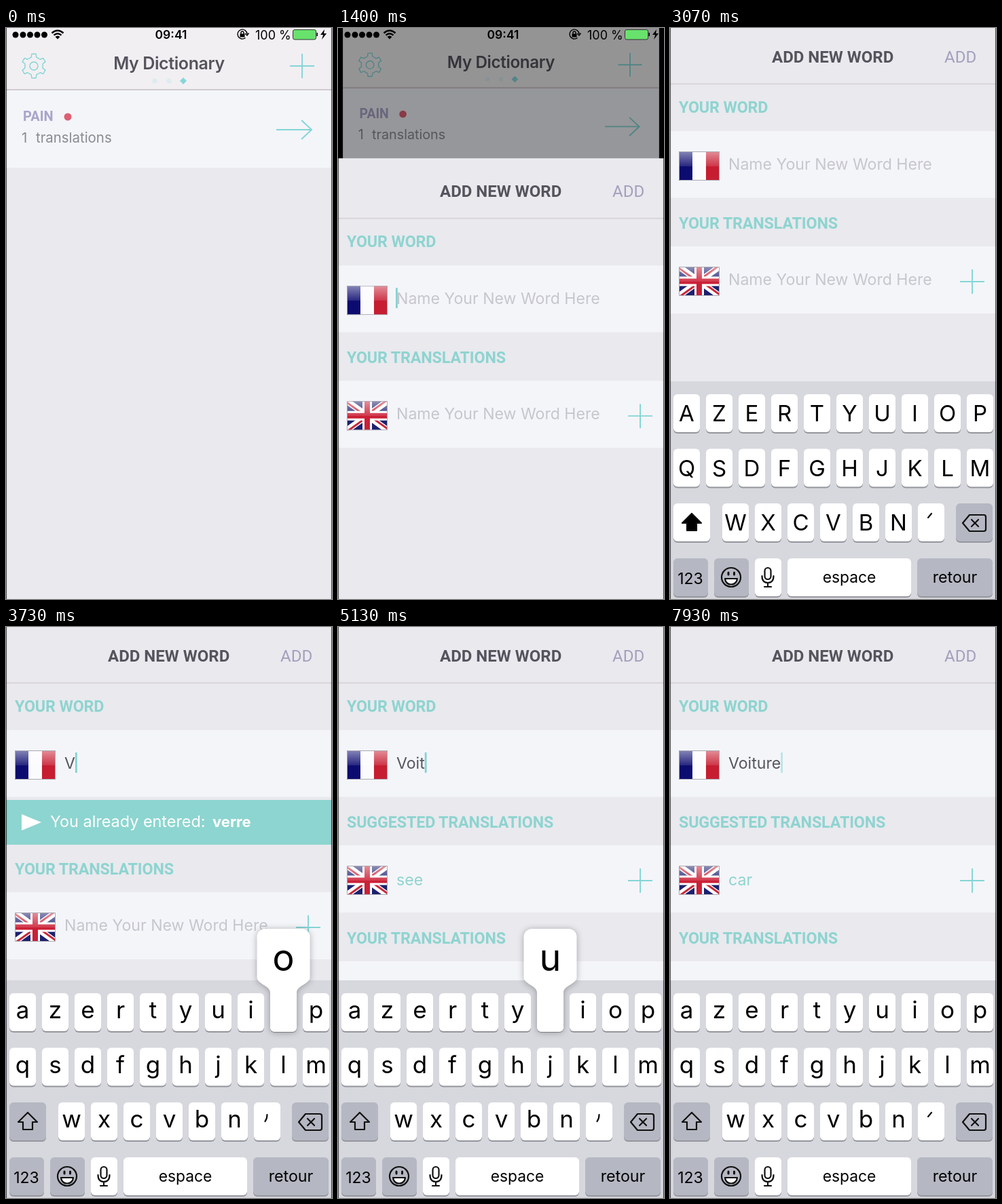
Animation of 480 by 842 pixels, one loop 8000 ms. Source, as an HTML page:

```html
<!DOCTYPE html>
<html lang="en">
<head>
<meta charset="utf-8">
<title>My Dictionary</title>
<style>
  html, body { margin: 0; width: 100%; height: 100%; overflow: hidden; background: #000; }
  svg.stage { display: block; width: 100%; height: 100%; }
  text { font-family: Inter, sans-serif; white-space: pre; }
  .caps { font: 600 23.3px Roboto, sans-serif; letter-spacing: -.15px; fill: #8ed4d0; }
  .field { font-size: 23.1px; fill: #55555d; }
  .hint { fill: #c6c6cd; }
  .teal { fill: #8ed4d0; }
  .line { fill: none; stroke: #84d5d6; stroke-width: 1.9; }
  .mid { text-anchor: middle; }
  .icon { fill: none; stroke: #111; stroke-width: 2.2; stroke-linejoin: round; stroke-linecap: round; }
  #pop { filter: drop-shadow(0 1px 5px rgba(0, 0, 0, .3)); }

  #page, #dim, #sheet, #keyboard { animation: 8s infinite; }
  #page { animation-name: recede; transform-origin: 240px 0; }
  #dim { animation-name: dim; }
  #sheet { animation-name: rise; }
  #keyboard { animation-name: open; }
  @keyframes recede { 0%, 14.02% { transform: scale(1); } 21.5%, 100% { transform: scale(.96); } }
  @keyframes dim { 0%, 14.02% { opacity: 0; } 21.5%, 100% { opacity: .5; } }
  @keyframes rise { 0%, 14.02% { transform: translateY(852px); } 21.5%, 100% { transform: translateY(0); } }
  @keyframes open { 0%, 27.85% { transform: translateY(322px); } 33.6%, 100% { transform: translateY(0); } }
</style>
</head>
<body>
<svg class="stage" viewBox="0 0 480 842">
  <defs>
    <linearGradient id="gloss" x2="0" y2="1">
      <stop offset="0" stop-color="#fff" stop-opacity=".5"/>
      <stop offset=".5" stop-color="#fff" stop-opacity=".12"/>
      <stop offset=".51" stop-color="#fff" stop-opacity="0"/>
    </linearGradient>
    <symbol id="shine" overflow="visible">
      <path fill="url(#gloss)" d="M0 0h60v43h-60z"/>
      <path fill="none" stroke="#a9a9b2" d="M.5 .5h59v42h-59z"/>
    </symbol>
    <symbol id="france" viewBox="0 0 60 43" width="60" height="43">
      <path fill="#fbfbfd" d="M0 0h60v43h-60z"/>
      <path fill="#0c0c70" d="M0 0h20v43h-20z"/>
      <path fill="#c71d31" d="M40 0h20v43h-20z"/>
      <use href="#shine"/>
    </symbol>
    <symbol id="britain" viewBox="0 0 60 43" width="60" height="43">
      <path fill="#1c2170" d="M0 0h60v43h-60z"/>
      <g fill="none" stroke="#fff">
        <path stroke-width="9" d="M0 0L60 43M60 0L0 43"/>
        <path stroke="#c8283a" stroke-width="3" d="M0 2l30 21.500M60-2l-30 21.500M60 41l-30-21.500M0 45l30-21.500"/>
        <path stroke-width="14" d="M30 0v43M0 21.500h60"/>
        <path stroke="#cb2036" stroke-width="8" d="M30 0v43M0 21.500h60"/>
      </g>
      <use href="#shine"/>
    </symbol>
    <path id="plus" class="line" d="M-18 0h36M0 -18v36"/>
  </defs>

  <rect width="480" height="842"/>
  <g id="page">
    <rect width="480" height="842" fill="#e9e9ee"/>
    <rect width="480" height="91" fill="#f1eff2"/>
    <rect y="92" width="480" height="114" fill="#f3f5f9"/>
    <path stroke="#c9c1c6" stroke-width="1.5" d="M0 91h480"/>
    <g class="line" style="stroke-width:1.4"><path id="gear" stroke-linejoin="round"/><circle cx="41" cy="56" r="6"/></g>
    <text class="mid" x="240" y="60.5" font-size="25" font-weight="600" letter-spacing="-.4" fill="#55545c">My Dictionary</text>
    <g fill="#dcebee"><circle cx="219" cy="78" r="3.5"/><circle cx="240" cy="78" r="3.5"/></g>
    <path fill="#86d6da" d="M261 73l5 5-5 5-5-5z"/>
    <use href="#plus" x="436" y="56"/>
    <text x="25" y="137" style="font:600 20px Roboto,sans-serif" fill="#a9a4cb">PAIN</text>
    <circle cx="91" cy="131" r="5.5" fill="#dc5f72"/>
    <text x="23" y="169" font-size="20.4" fill="#8b8b92">1</text>
    <text x="44" y="169" font-size="20.4" fill="#8b8b92">translations</text>
    <path class="line" d="M398 150h52M435 136l15 14-15 14"/>
  </g>
  <rect id="dim" width="480" height="842"/>

  <g id="status">
    <circle cx="14" cy="10" r="4.5"/><circle cx="25" cy="10" r="4.5"/><circle cx="35.5" cy="10" r="4.5"/>
    <circle cx="46" cy="10" r="4.5"/><circle cx="56.5" cy="10" r="4.5"/>
    <path fill="none" stroke="#000" stroke-width="2.4" d="M67.5 7.5q8.500-7.500 17 0M70.500 10.700q5.500-5 11 0"/>
    <path d="M72.500 13q3.500-3 7 0l-3.500 3.500z"/>
    <text class="mid" x="243" y="16" font-size="17.5" font-weight="600">09:41</text>
    <path fill="none" stroke="#000" stroke-width="1.4" d="M355 9a7 7 0 1 0-2.500 5.500M352 8l3 3 2.500-3.500M346 9v-2a2 2 0 0 1 4 0v2"/>
    <path d="M344.500 8.500h7v5h-7z"/>
    <text x="367" y="16.500" font-size="18">100 %</text>
    <rect x="422.500" y="2.500" width="34" height="14.500" rx="2.500" fill="#68e26c" stroke="#333"/>
    <path d="M457.500 7h1.500v5h-1.500zM469 2l-6 8h4l-2 7 7-9h-4z"/>
  </g>

  <g id="sheet">
    <rect y="-6" width="480" height="860" fill="#e9e9ee"/>
    <path stroke="#d9d4d9" stroke-width="2" d="M0 82.500h480"/>
    <text x="150" y="51" style="font:600 24px Roboto,sans-serif" fill="#55545d">ADD NEW WORD</text>
    <text x="404" y="51" style="font:400 24px Roboto,sans-serif" fill="#a3a0bd">ADD</text>

    <text class="caps" x="13" y="125">YOUR WORD</text>
    <rect y="152" width="480" height="98.500" fill="#f4f5f9"/>
    <use href="#france" x="13" y="182"/>
    <text id="prompt" class="field hint" x="86" y="209">Name Your New Word Here</text>
    <text id="word" class="field" x="86" y="209"></text>
    <rect id="caret" y="185" width="2.800" height="30" fill="#84d3d2"/>

    <g id="banner">
      <rect y="255" width="480" height="66" fill="#8dd5d0"/>
      <path fill="#fff" d="M23 276l29 12-29 12z"/>
      <text class="field" x="65" y="295" style="fill:#fff;font-size:23.4px">You already entered:</text>
      <text class="field" x="304" y="295" style="fill:#fff;font-size:22px;font-weight:700">verre</text>
    </g>

    <g id="suggested">
      <text class="caps" x="13" y="296">SUGGESTED TRANSLATIONS</text>
      <rect y="322" width="480" height="99" fill="#f4f5f9"/>
      <use href="#britain" x="13" y="352"/>
      <text id="match" class="field teal" x="86" y="380.500"></text>
      <use href="#plus" x="445" y="374"/>
    </g>

    <g id="translations">
      <text class="caps" x="13" y="296">YOUR TRANSLATIONS</text>
      <rect y="322" width="480" height="99" fill="#f4f5f9"/>
      <use href="#britain" x="13" y="352"/>
      <text class="field hint" x="86" y="379">Name Your New Word Here</text>
      <use href="#plus" x="445" y="374"/>
    </g>

    <g id="keyboard">
      <rect y="521" width="480" height="340" fill="#d7d8de"/>
      <g id="keys"></g>
      <path id="shift" class="icon" d="M32 716l14 14h-7v11h-14v-11h-7z"/>
      <path id="accent" class="icon"/>
      <path class="icon" d="M441 718h21q3 0 3 3v18q0 3-3 3h-21l-10-12zM444 725l10 10M454 725l-10 10"/>
      <g class="icon">
        <circle cx="90" cy="810" r="14"/>
        <path fill="#fff" d="M81 812h18q-1 8.500-9 8.500t-9-8.500z"/>
        <path stroke-width="3" d="M86 803v3M94.500 803v3"/>
        <rect x="139.500" y="796" width="9" height="17" rx="4.500"/>
        <path d="M135.500 808q0 10 8.500 10t8.500-10M144 818v6M139 824h10"/>
      </g>
      <text class="mid" x="30" y="819.500" font-size="23">123</text>
      <text class="mid" x="264" y="818" font-size="22.800">espace</text>
      <text class="mid" x="419.500" y="818" font-size="23.200">retour</text>
      <g id="pop">
        <path fill="#fff" d="M-39-83a12 12 0 0 1 12-12h54a12 12 0 0 1 12 12v60c0 9-19.500 12-19.500 22v52a6 6 0 0 1-6 6h-27a6 6 0 0 1-6-6v-52c0-10-19.500-13-19.500-22z"/>
        <text id="popLabel" class="mid" y="-33" font-size="54"></text>
      </g>
    </g>
  </g>
  <path stroke="#000" stroke-opacity=".65" stroke-width="1.200" d="M.5 0v842M479.500 0v842"/>
</svg>

<script>
const $ = id => document.getElementById(id);
const LOOP = 8000, PRESS = 130;
const strokes = [['V', 3400], ['o', 3800], ['i', 4270], ['t', 4725], ['u', 5200], ['r', 5665], ['e', 6130]];

function add(parent, tag, attrs, label = '') {
  const node = document.createElementNS('http://www.w3.org/2000/svg', tag);
  for (const name in attrs) node.setAttribute(name, attrs[name]);
  node.textContent = label;
  return parent.appendChild(node);
}

function addKey(x, y, width, fill = '#fff') {
  const box = { x, width, height: 56, rx: 6 };
  add($('keys'), 'rect', { ...box, y: y + 2, fill: '#94969d' });
  return add($('keys'), 'rect', { ...box, y, fill });
}

const letters = {};
[['azertyuiop', 5, 540], ['qsdfghjklm', 5, 620.5], ['wxcvbn', 77, 701]].forEach(([row, left, top]) => {
  [...row].forEach((char, i) => {
    const x = left + 48 * i, mid = x + 19.5;
    addKey(x, top, 39);
    letters[char] = { mid, top, node: add($('keys'), 'text', { class: 'mid', x: mid }) };
  });
});
const GREY = '#b5b8c2';
const shiftKey = addKey(5, 701, 54);
addKey(365, 701, 39);
addKey(421, 701, 54, GREY);
addKey(5, 782, 51, GREY);
addKey(65, 782, 51, GREY);
addKey(125, 782, 39);
addKey(173, 782, 182);
addKey(364, 782, 111, GREY);

// Six teeth, four corners each
const teeth = Array.from({ length: 24 }, (_, i) => {
  const angle = (Math.floor(i / 4) + [-.27, -.17, .17, .27][i % 4]) * Math.PI / 3 - Math.PI / 2;
  const radius = i % 4 % 3 ? 18 : 13.5;
  return `${41 + radius * Math.cos(angle)} ${56 + radius * Math.sin(angle)}`;
});
$('gear').setAttribute('d', `M${teeth.join('L')}Z`);

const show = (id, on) => $(id).setAttribute('visibility', on ? 'inherit' : 'hidden');
const clamp = v => Math.min(1, Math.max(0, v));
const ramp = (t, from, to) => {
  const p = clamp((t - from) / (to - from));
  return p * p * (3 - 2 * p);
};

let upper;
function setCase(on) {
  if (on === upper) return;
  upper = on;
  for (const [char, { node, top }] of Object.entries(letters)) {
    node.textContent = on ? char.toUpperCase() : char;
    node.setAttribute('y', top + (on ? 40 : 37));
    node.setAttribute('font-size', on ? 33 : 35);
  }
  shiftKey.setAttribute('fill', on ? '#fff' : GREY);
  $('shift').style.fill = on ? '#000' : 'none';
}

function caretAlpha(t) {
  if (t > 3400 && t < 6370) return 1;
  const phase = ((t - (t < 3400 ? 2200 : 6370)) / 1000 + 3) % 1;
  return phase < .5 ? 1 : phase < .62 ? (.62 - phase) / .12 : clamp((phase - .88) / .12);
}

function draw(t) {
  const word = strokes.filter(([, up]) => t >= up).map(([char]) => char).join('');
  setCase(!word);
  $('word').textContent = word;
  show('prompt', !word);
  $('caret').setAttribute('x', word ? 86 + $('word').getComputedTextLength() : 85);
  $('caret').setAttribute('opacity', caretAlpha(t));
  const vowel = !word || 'oiue'.includes(word.slice(-1));
  $('accent').setAttribute('d', vowel ? 'M380 722l5-6' : 'M384.500 719q0 6-3 10');

  const banner = ramp(t, 3470, 3660) - ramp(t, 3830, 4000);
  const suggested = t >= 4310;
  show('banner', banner > 0);
  $('banner').setAttribute('opacity', banner);
  show('suggested', suggested);
  $('match').textContent = t < 6400 ? 'see' : 'car';
  $('translations').setAttribute('transform', `translate(0 ${suggested ? 171 : 69 * banner})`);

  const pressed = strokes.find(([, up]) => t >= up - PRESS && t < up);
  show('pop', pressed);
  if (pressed) {
    const { mid, top } = letters[pressed[0].toLowerCase()];
    $('pop').setAttribute('transform', `translate(${mid} ${top})`);
    $('popLabel').textContent = pressed[0];
  }
}

let start;
function tick(now) {
  start ??= now;
  draw((now - start) % LOOP);
  requestAnimationFrame(tick);
}
draw(0);
requestAnimationFrame(tick);
</script>
</body>
</html>
```
